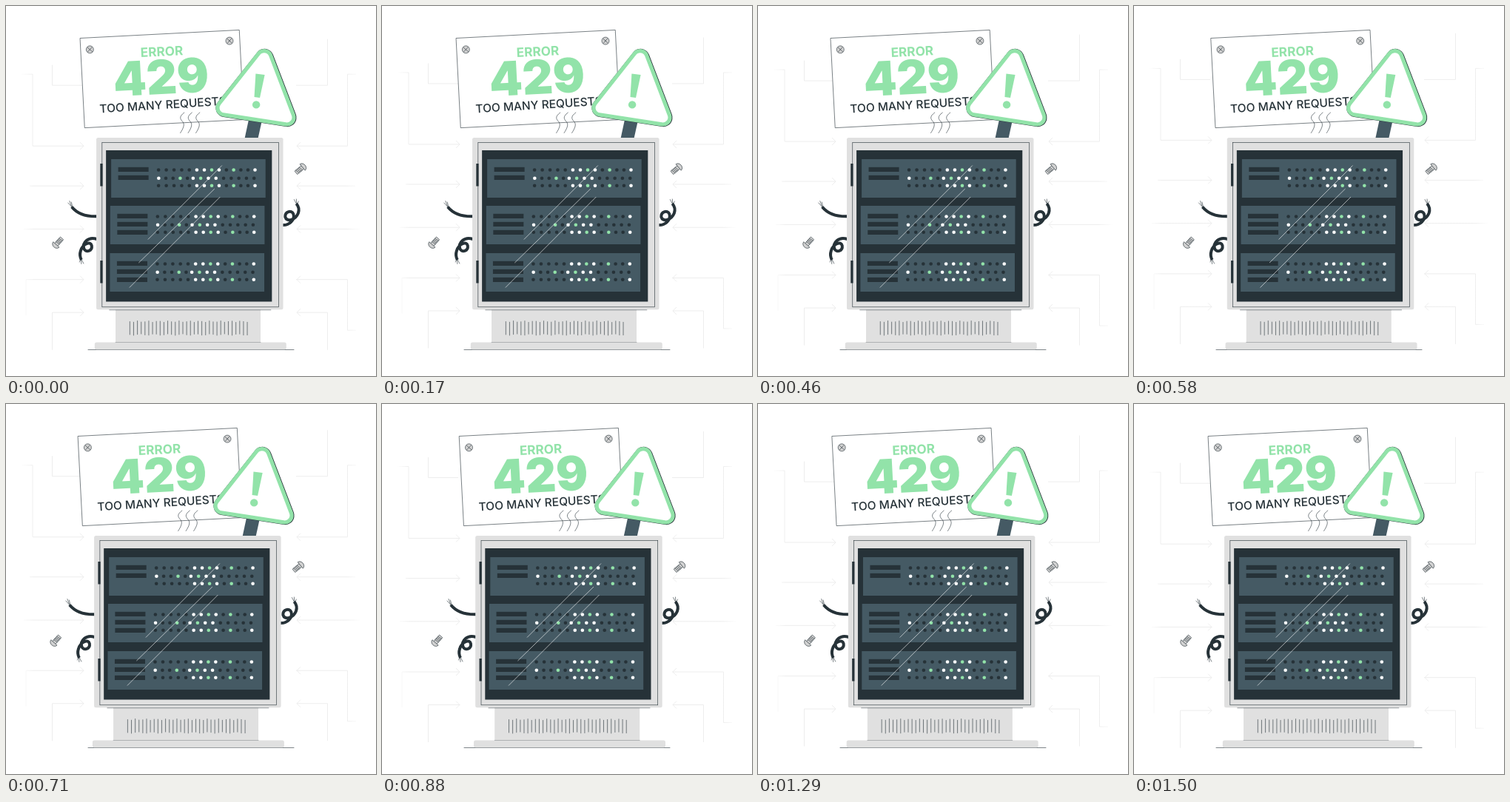
These frames come from a looping animation (500x500 px, 1540 ms). An HTML page:

```html
<!DOCTYPE html>
<html lang="en">
<head>
<meta charset="utf-8">
<title>Error 429</title>
<style>
  html, body { margin: 0; width: 100%; height: 100%; overflow: hidden; background: #fff; }
  svg { display: block; width: 100vw; height: 100vh; }
  text { font-family: Inter, "Open Sans", sans-serif; }
  .line { fill: none; stroke: #263238; stroke-width: .6; stroke-linecap: round; }
  .wire { fill: none; stroke: #263238; stroke-width: 4; }
  .flow { fill: none; stroke: url(#fade); stroke-width: .9; }
  .dark { fill: #263238; }
  .slate { fill: #455a64; }
  .grey { fill: #e0e0e0; }
  .green { fill: #92e3a9; }
  .metal { fill: #d2d2d2; stroke: #263238; stroke-width: .6; }
  .glare { fill: none; stroke: #fff; stroke-width: .6; }
  .tri { stroke-linejoin: round; }
</style>
</head>
<body>
<svg viewBox="0 0 500 500">
  <defs>
    <linearGradient id="fade" gradientUnits="userSpaceOnUse" x1="0" x2="500" y1="0" y2="0">
      <stop offset=".04" stop-color="#fff"/>
      <stop offset=".075" stop-color="#ebebeb"/>
      <stop offset=".92" stop-color="#ebebeb"/>
      <stop offset=".96" stop-color="#fff"/>
    </linearGradient>
    <g id="screw">
      <circle class="metal" r="5"/>
      <path class="line" d="M-3-3L3 3M-3 3L3-3"/>
    </g>
    <g id="bolt">
      <path class="metal" d="M1-2.8H13V2.8H1Z"/>
      <path class="line" d="M4-2.8L5 2.8M6-2.8L7 2.8M8-2.8L9 2.8M10-2.8L11 2.8"/>
      <path class="metal" d="M1.5-5.5V5.5C-4.5 5-4.5-5 1.5-5.5Z"/>
    </g>
    <path id="tri" class="tri" d="M349 70L295.500 137.600L379.800 150.600Z"/>
  </defs>

  <g id="flows" class="flow">
    <path d="M62.500 80V107.500H103M434.500 45V107.500H392"/>
    <path d="M20 92.500H36V189.500H105M473 92.500H461.500V189.500H393"/>
    <path d="M32 243.500H105M472 243.500H393"/>
    <path d="M24 301.800H105M480 301.800H393"/>
    <path d="M27 418V370H105M473 438.500H461.500V370H392"/>
    <path d="M62.500 465V414.500H105M434.500 465V414.500H393"/>
  </g>

  <path class="line" d="M111 464.500H389"/>

  <g id="rig">
    <path class="wire" d="M123 284.300Q100 285 89 271.500"/>
    <path class="line" d="M89.500 272L84 266M89 271.500L86 263.500M90 271.500L88.500 265"/>
    <path class="wire" d="M123 315C111 311 103 320 105.500 328C108 334 117 331 116 324C114.500 317 104 321 101 331Q99 337 102 343"/>
    <path class="line" d="M101.500 342L102 348.500M102 342L105 348M101 342L99.500 346"/>
    <path class="wire" d="M373 296C383 297 391 289 388.500 281C386 275 377 278 377.500 285C379 292 391 290 395 280Q397.500 273 392.500 267"/>
    <path class="line" d="M393 268L389.500 261.500M393 268L392.500 261M393.500 268L395.500 264"/>
    <use href="#bolt" transform="translate(402 217) rotate(140)"/>
    <use href="#bolt" transform="translate(67 323.500) rotate(-48)"/>

    <path class="slate" d="M328.500 152L346 155L340.700 179H322.700Z"/>

    <g transform="translate(100.200 43.500) rotate(-2.950)">
      <path fill="#fff" stroke="#263238" stroke-width=".6" d="M0 0H215.500V121.300H0Z"/>
      <use href="#screw" x="12.500" y="16"/>
      <use href="#screw" x="201.500" y="14"/>
      <text class="green" x="109.300" y="29.800" text-anchor="middle" font-size="17.200" font-weight="700">ERROR</text>
      <text class="green" x="106.500" y="81" text-anchor="middle" font-size="64" font-weight="900">429</text>
      <text class="dark" transform="translate(21.500 102.200) rotate(-.7)" font-size="15.500" font-weight="500">TOO MANY REQUESTS</text>
    </g>

    <use href="#tri" x=".5" y=".2" stroke="#263238" stroke-width="24.800" fill="#263238"/>
    <use href="#tri" stroke="#92e3a9" stroke-width="24" fill="#92e3a9"/>
    <use href="#tri" stroke="#fff" stroke-width="13.600" fill="#fff"/>
    <path class="green" d="M337.600 91.500L349.800 93L343.200 123.900L335.700 122.900Z"/>
    <circle class="green" cx="338.300" cy="133.400" r="5.200"/>

    <g class="line">
      <path id="smoke" d="M241 144C233 150 236 153 239 156.500S240 165 235.800 171.500"/>
      <use href="#smoke" x="10.500"/>
      <use href="#smoke" x="21"/>
    </g>

    <rect class="grey" x="148.200" y="408" width="196" height="47"/>
    <path class="line" d="M140 410.700H358"/>
    <path id="slots" class="line"/>
    <rect class="grey" x="120" y="454.500" width="259" height="9.700" rx="2.500"/>
    <path class="line" stroke-opacity=".45" d="M148.200 454.500H344.200"/>

    <rect class="grey" x="122.200" y="178" width="252.500" height="232.300" rx="2.500"/>
    <rect class="line" x="130" y="184.300" width="238.700" height="222.500"/>
    <rect class="dark" x="135.300" y="195" width="224.200" height="204.500"/>
    <path class="dark" d="M127.500 213H130.800V243.500H127.500ZM127.500 344H130.800V374.500H127.500Z"/>
    <g id="units"></g>
    <path class="glare" d="M292 215.500L192 315.500M282 247L179.500 347M289.500 258L167 380.500"/>
  </g>
</svg>
<script>
  const $ = id => document.getElementById(id);
  const NS = 'http://www.w3.org/2000/svg';
  const add = (parent, tag, attrs) => {
    const el = document.createElementNS(NS, tag);
    for (const k in attrs) el.setAttribute(k, attrs[k]);
    parent.append(el);
  };

  // Arrowheads on both sides
  for (const y of [189.5, 243.5, 301.8, 370, 414.5]) {
    add($('flows'), 'path', { d: `M100 ${y - 5}L105 ${y}L100 ${y + 5}M398 ${y - 5}L393 ${y}L398 ${y + 5}` });
  }

  // Vent slots
  let slots = '';
  for (let i = 0; i < 32; i++) {
    slots += `M${167.5 + i * 5.12} ${426.5 + Math.sin(i * 2.3)}V${444 + Math.sin(i * 1.7)}`;
  }
  $('slots').setAttribute('d', slots);

  // Lamps: w white, g green, - off
  const WIDE = '-----wwgw-g--w';
  const MID = 'w--g-wgww-----';
  const COLORS = { w: '#fff', g: '#92e3a9', '-': '#263238' };
  const units = [
    { x: 142.3, y: 207, bars: 2 },
    { x: 141, y: 270, bars: 3 },
    { x: 140.6, y: 334, bars: 3 }
  ];
  // Spacing tightens slightly to the right
  const wideX = i => 64 + 10.55 * i - 0.04 * i * i;
  const midX = i => 64.2 + (i < 5 ? 9.7 * i : 46.5 + 10.3 * (i - 5));

  for (const { x, y, bars } of units) {
    add($('units'), 'rect', { class: 'slate', x, y, width: 208.6, height: 52 });
    for (let b = 0; b < bars; b++) {
      add($('units'), 'rect', { class: 'dark', x: x + 9.5, y: y + 10.8 + b * 11, width: 41, height: 6.2 });
    }
    const lamps = (row, dotX, dy) => [...row].forEach((lamp, i) => {
      add($('units'), 'circle', { cx: x + dotX(i), cy: y + dy, r: 2.3, fill: COLORS[lamp] });
    });
    lamps(WIDE, wideX, 14.5);
    lamps(MID, midX, 25.7);
    lamps(WIDE, wideX, 35.8);
  }

  const LOOP = 1540, CYCLE = 1500, STEP = 1000 / 24, LEAD = 25;
  const SHAKE = [0, -1, 2, -4, 4, -4, 4, -4, 2, -1, 0];

  function draw(now) {
    // Motion advances in 24 fps steps
    const step = Math.floor((now % LOOP + 4) / STEP);
    const p = (step * STEP + LEAD) % CYCLE / CYCLE;
    const i = Math.floor(p * 10);
    const dx = SHAKE[i] + (SHAKE[i + 1] - SHAKE[i]) * (p * 10 - i);
    const dy = -10 * (1 - Math.abs(1 - 2 * p));
    $('rig').setAttribute('transform', `translate(${dx} 0)`);
    $('flows').setAttribute('transform', `translate(0 ${dy})`);
  }
  const tick = () => {
    draw(performance.now());
    requestAnimationFrame(tick);
  };
  tick();
</script>
</body>
</html>
```
